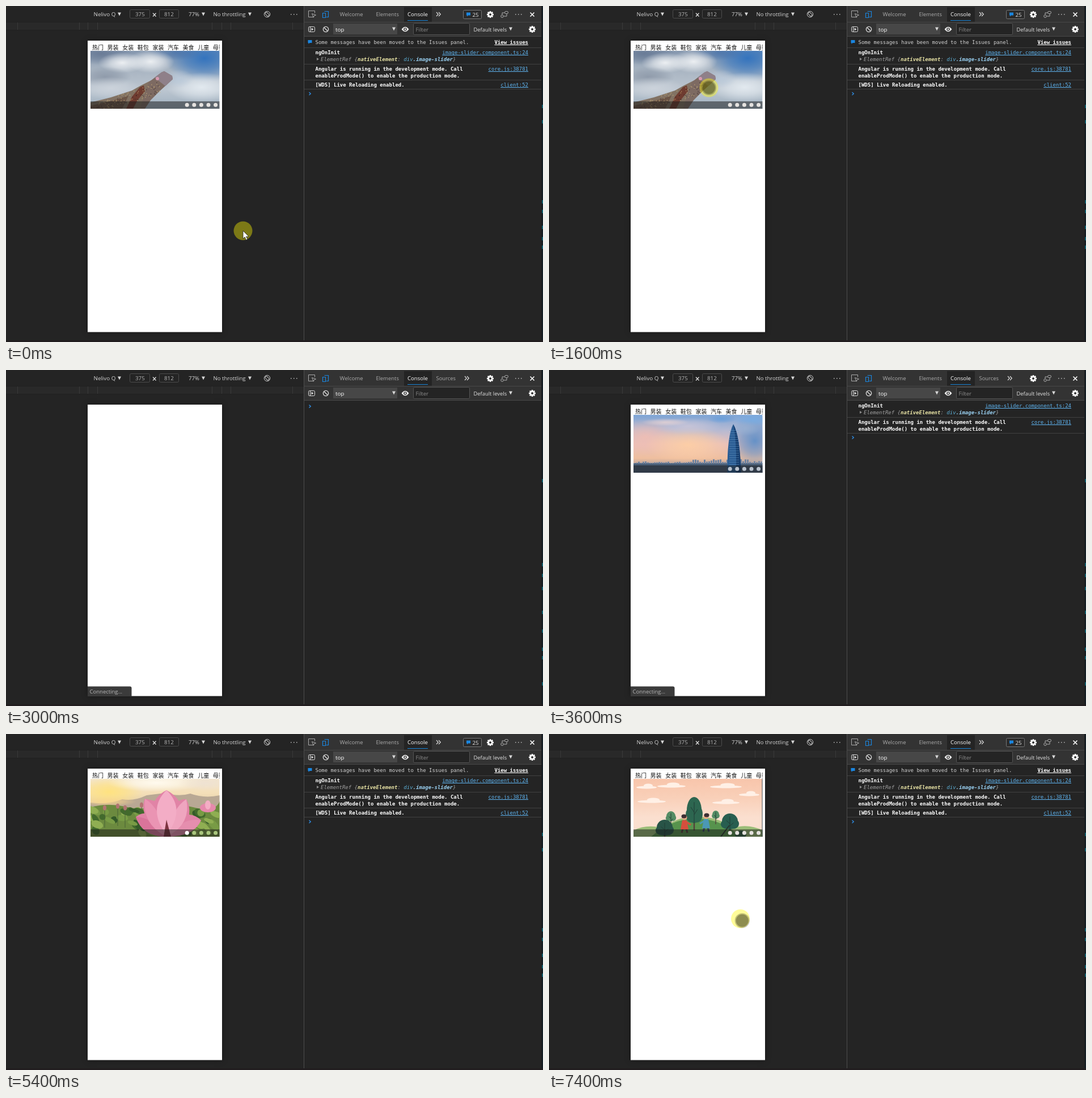
An HTML page with a canvas that plays this animation: 947 px wide and 592 px high, repeating every 8 s.

```html
<!DOCTYPE html>
<html lang="en">
<head>
<meta charset="utf-8">
<title>Slider preview</title>
<style>
  html, body { margin: 0; width: 100%; height: 100%; overflow: hidden; background: #242424; }
  canvas { display: block; }
</style>
</head>
<body>
<canvas id="stage" width="947" height="592"></canvas>
<script>
const ctx = document.getElementById('stage').getContext('2d');
const LOOP = 8000;
const UI = '"Open Sans", "Noto Sans", sans-serif';
const MONO = '"DejaVu Sans Mono", monospace';
const CJK = '"Noto Sans CJK SC", "Noto Sans CJK", "Noto Sans CJK JP", sans-serif';
const PHOTO = { x: 149, y: 79, w: 227.5, h: 102 };

// from, to, x, y, pointer kind, pointer offset from the highlight
const POINTER = [
  [0, 200, 418, 396, 'arrow', 0],
  [200, 400, 368, 233, 'touch', 0],
  [600, 800, 328, 199, 'touch', 0],
  [1600, 1800, 282, 144, 'touch', 0],
  [1800, 2000, 151, 31, 'arrow', 0],
  [2000, 2200, 109, -13, 'arrow', 0],
  [6600, 8000, 337.5, 325.5, 'touch', 3.2]
];

function rect(x, y, w, h, color) {
  ctx.fillStyle = color;
  ctx.fillRect(x, y, w, h);
}
function frame(x, y, w, h, color, fill) {
  ctx.beginPath();
  ctx.roundRect(x + .5, y + .5, w - 1, h - 1, 2);
  if (fill) { ctx.fillStyle = fill; ctx.fill(); }
  ctx.strokeStyle = color;
  ctx.lineWidth = 1;
  ctx.stroke();
}
function poly(points, color) {
  ctx.beginPath();
  for (let i = 0; i < points.length; i += 2) ctx.lineTo(points[i], points[i + 1]);
  ctx.closePath();
  ctx.fillStyle = color;
  ctx.fill();
}
function shape(path, color) {
  ctx.fillStyle = color;
  ctx.fill(new Path2D(path));
}
function line(path, color, width = 1) {
  ctx.strokeStyle = color;
  ctx.lineWidth = width;
  ctx.stroke(new Path2D(path));
}
function oval(x, y, rx, ry, color, angle = 0) {
  ctx.beginPath();
  ctx.ellipse(x, y, rx, ry, angle, 0, Math.PI * 2);
  ctx.fillStyle = color;
  ctx.fill();
}
const dot = (x, y, r, color) => oval(x, y, r, r, color);
function ring(x, y, r, color, width = 1) {
  ctx.beginPath();
  ctx.arc(x, y, r, 0, Math.PI * 2);
  ctx.strokeStyle = color;
  ctx.lineWidth = width;
  ctx.stroke();
}
// soft oval patch; color is "r,g,b"
function glow(x, y, rx, ry, color, alpha = 1) {
  ctx.save();
  ctx.translate(x, y);
  ctx.scale(rx, ry);
  const g = ctx.createRadialGradient(0, 0, 0, 0, 0, 1);
  g.addColorStop(0, `rgba(${color},${alpha})`);
  g.addColorStop(.5, `rgba(${color},${alpha * .6})`);
  g.addColorStop(1, `rgba(${color},0)`);
  ctx.fillStyle = g;
  ctx.fillRect(-1, -1, 2, 2);
  ctx.restore();
}
function backdrop(colors) {
  const g = ctx.createLinearGradient(0, PHOTO.y, 0, PHOTO.y + PHOTO.h);
  colors.forEach((c, i) => g.addColorStop(i / (colors.length - 1), c));
  rect(PHOTO.x, PHOTO.y, PHOTO.w, PHOTO.h, g);
}
function random(seed) {
  return () => (seed = (seed * 16807) % 2147483647) / 2147483647;
}
function text(str, x, y, size, color, family = UI, style = '') {
  ctx.font = `${style} ${size}px ${family}`;
  ctx.fillStyle = color;
  ctx.fillText(str, x, y);
  return x + ctx.measureText(str).width;
}
const mono = (str, x, y, color, style = 'bold') => text(str, x, y, 9, color, MONO, style);
function link(str, y, color = '#5fb4f0', style = '') {
  ctx.font = `${style} 9px ${MONO}`;
  const w = ctx.measureText(str).width;
  mono(str, 921 - w, y, color, style);
  rect(921 - w, y + 1, w, 1, color);
}
const caret = (x, y) => poly([x - 3, y - 3, x + 3, y - 3, x, y + 3], '#d8d8d8');
function ellipsis(x, y) {
  for (let i = -1; i < 2; i++) rect(x + i * 5 - 1, y, 1.5, 1.5, '#bbb');
}
function gear(x, y) {
  for (let i = 0; i < 8; i++) {
    ctx.save();
    ctx.translate(x, y);
    ctx.rotate(i * Math.PI / 4);
    rect(-1.3, -6, 2.6, 3, '#fff');
    ctx.restore();
  }
  ring(x, y, 3.3, '#fff', 2.6);
}

function deviceBar() {
  rect(0, 0, 525, 592, '#242424');
  text('Nelivo Q', 154.5, 18, 9.8, '#d4d4d4');
  caret(200, 14.5);
  frame(218, 6, 36, 16, '#4c4c4c', '#242424');
  text('375', 228, 18, 9.8, '#b5b5b5');
  line('M259 12.5l5.5 6m0-6l-5.5 6', '#ddd', 1.3);
  frame(270, 6, 35, 16, '#4c4c4c', '#242424');
  text('812', 279, 18, 9.8, '#b5b5b5');
  text('77%', 322, 18, 9.6, '#d4d4d4');
  caret(348, 14.5);
  text('No throttling', 365.5, 18, 9.6, '#d4d4d4');
  caret(430, 14.5);
  ctx.save();
  ctx.translate(460.5, 14.5);
  ctx.rotate(-Math.PI / 4);
  frame(-2.5, -4.5, 5, 9, '#d0d0d0');
  ctx.restore();
  ring(460.5, 14.5, 5.2, '#d0d0d0');
  ellipsis(508, 14);
  rect(0, 28, 525, 15, '#292929');
  rect(0, 28, 525, 1, '#202020');
  rect(0, 42, 525, 1, '#1f1f1f');
  for (const x of [20, 129, 144, 161, 363, 380, 396, 505]) rect(x, 29, 1, 13, '#3a3a3a');
}

function tabBar(loading) {
  rect(526, 0, 418, 53, '#333');
  rect(702, 2, 49, 26, '#242424');
  line('M543 19.5h-9.500v-11h11v4M539.500 13.500l7 2.500-3 1.200-1.200 3z', '#aaa');
  line('M561.500 9.500h7v10h-4M558.500 12.500h5v8h-5z', '#1a86e0', 1.2);
  text('Welcome', 588.5, 18, 9.6, '#adadad');
  text('Elements', 652.5, 18, 9.4, '#adadad');
  text('Console', 708, 18, 9.6, '#fff');
  rect(708, 25, 36, 1, '#1a86d9');
  if (loading) text('Sources', 758.5, 18, 9.4, '#adadad');
  const x = loading ? 809 : 759;
  line(`M${x} 11l3.300 3.500-3.300 3.500m4-7l3.300 3.500-3.300 3.500`, '#ddd', 1.2);
  if (!loading) {
    frame(806, 7, 33, 16, '#777', '#2b2b2b');
    shape('M812 11.500h7v5h-4l-2 2v-2h-1z', '#1a86e0');
    text('25', 822.5, 18.5, 9.8, '#e0e0e0');
  }
  gear(854, 15);
  frame(879, 9, 7, 5, '#b0b0b0');
  ring(875, 18, 2.3, '#b0b0b0');
  line('M883 14v4h-5M875 15v-3h4', '#b0b0b0');
  ellipsis(904, 14);
  line('M924.500 11.500l7 7m0-7l-7 7', '#fff', 1.6);

  rect(526, 28, 418, 1, '#484848');
  frame(533, 36, 12, 10, '#ddd');
  rect(536, 36, 1, 10, '#ddd');
  poly([538.5, 38.5, 542.5, 41, 538.5, 43.5], '#ddd');
  ring(564, 41, 4.6, '#ddd', 1.4);
  line('M561 38l6 6', '#ddd', 1.4);
  rect(577, 31, 113, 19, '#474747');
  text('top', 581, 44.5, 9.8, '#fff');
  caret(684, 40.5);
  shape('M697.500 41q6.500-8.500 13 0q-6.500 8.500-13 0z', '#f0f0f0');
  dot(704, 41, 2.8, '#333');
  dot(704, 41, 1.4, '#f0f0f0');
  frame(718, 30, 100, 21, '#555', '#242424');
  text('Filter', 722.5, 44.5, 9.6, '#8d8d8d');
  text('Default levels', 824.5, 44.5, 9.4, '#e2e2e2');
  caret(890, 40.5);
  gear(928, 41);
  rect(526, 53, 418, 1, '#484848');
}

// rows: 0 = cleared, 1 = first messages, 2 = with reload note, 3 = with issue row
function consoleLog(rows) {
  rect(526, 54, 418, 538, '#242424');
  const rule = y => rect(526, y, 418, 1, '#414141');
  let prompt = 64;
  ctx.save();
  if (rows === 3) {
    shape('M532.500 60h7v5h-4l-2 2v-2h-1z', '#1a86e0');
    mono('Some messages have been moved to the Issues panel.', 545.5, 67, '#d2d2d2', '');
    link('View issues', 67, '#fff', 'bold');
    rule(73);
  } else ctx.translate(0, -19);
  if (rows > 0) {
    mono('ngOnInit', 545.5, 85, '#fff');
    link('image-slider.component.ts:24', 85);
    poly([548, 91, 552, 93.500, 548, 96], '#8a8a8a');
    let x = mono('ElementRef {', 555, 97, '#a0a0a0', 'italic');
    x = mono('nativeElement', x, 97, '#e8e3a5', 'italic bold');
    x = mono(': ', x, 97, '#a0a0a0', 'italic');
    x = mono('div', x, 97, '#5db0d7', 'italic');
    x = mono('.image-slider', x, 97, '#9bd3f5', 'italic bold');
    mono('}', x, 97, '#a0a0a0', 'italic');
    rule(102);
    mono('Angular is running in the development mode. Call', 545.5, 114, '#fff');
    mono('enableProdMode() to enable the production mode.', 545.5, 126, '#fff');
    link('core.js:38781', 114);
    rule(130);
    prompt = 138;
  }
  if (rows > 1) {
    mono('[WDS] Live Reloading enabled.', 545.5, 142, '#fff');
    link('client:52', 142);
    rule(146);
    prompt = 154.5;
  }
  if (rows === 0) prompt += 19;
  line(`M534.500 ${prompt - 2.5}l2.800 2.500-2.800 2.500`, '#2f8fe8', 1.3);
  ctx.restore();
}

function edges(late) {
  rect(525, 0, 1, 592, '#4d4d4d');
  rect(944, 0, 1, 592, '#1a1a1a');
  rect(945, 0, 2, 592, '#172126');
  const marks = late ? [195, 343, 362, 385, 427, 460, 492, 507, 553] : [177, 204, 345, 362, 390, 410, 425];
  for (const y of marks) rect(945, y - 3, 2, 6, '#12606f');
  rect(0, 589, 947, 3, '#211d1f');
}

function skyPhoto() {
  backdrop(['#8496ae', '#a9b5c2', '#bcc6d0', '#9fb0bf']);
  glow(350, 92, 70, 42, '52,116,190', 1);
  glow(300, 82, 48, 14, '70,112,168', .7);
  glow(168, 84, 55, 20, '98,116,144', .8);
  glow(205, 100, 42, 18, '236,239,242', 1);
  glow(255, 98, 42, 20, '236,239,242', 1);
  glow(175, 125, 46, 18, '122,134,152', .6);
  glow(345, 143, 62, 26, '226,233,239', 1);
  glow(305, 128, 26, 16, '186,202,219', .8);
  glow(185, 145, 52, 20, '205,212,220', .9);
  poly([149, 181, 149, 170, 185, 161, 222, 149, 238, 140, 256, 131, 264, 146, 248, 168, 240, 181], '#827263');
  poly([149, 181, 149, 176, 190, 166, 216, 158, 205, 181], '#6c5648');
  poly([252, 134, 274, 117, 279, 115, 293, 123, 294, 129, 272, 149, 255, 166, 245, 181, 236, 181], '#7d6a62');
  poly([262, 126, 274, 117, 279, 115, 293, 123, 294, 129, 281, 141], '#8f8089');
  poly([222, 160, 236, 143, 243, 140, 245, 150, 232, 166, 224, 181, 212, 181], '#6f3c30');
  const rnd = random(41);
  for (let i = 0; i < 110; i++) {
    const x = 160 + rnd() * 112, y = 170 - (x - 160) * .34 + rnd() * 20;
    rect(x, y, 1.4, 1.6, i % 3 ? 'rgba(216,188,126,.6)' : 'rgba(50,36,38,.6)');
  }
  dot(267, 128, 3, '#d79ab0');
}

function towerPhoto() {
  backdrop(['#7da4d5', '#b3b9d3', '#e7c0bb', '#efbf9f', '#7d8395']);
  glow(170, 118, 60, 32, '242,190,178', .85);
  glow(245, 132, 75, 32, '253,206,165', .95);
  glow(245, 99, 60, 15, '205,199,216', .8);
  glow(205, 92, 42, 7, '239,214,211', .75);
  glow(363, 125, 45, 45, '95,143,199', .95);
  glow(360, 87, 38, 12, '120,172,226', .9);
  glow(346, 103, 28, 13, '153,176,209', .8);
  glow(305, 86, 26, 8, '100,157,219', .8);
  rect(149, 164, 228, 17, '#4a5f78');
  const rnd = random(9);
  for (let x = 149; x < 376; x += 4) {
    const h = 1 + rnd() * (x > 250 ? 7 : 3);
    rect(x, 165 - h, 3, h, '#6f83a0');
  }
  shape('M314.500 181Q314 116 325 95.500Q337 116 338.500 181z', '#2b5d94');
  shape('M325 95.500Q337 116 338.500 181H330Q331 125 325 95.500z', '#173f70');
  for (let y = 106; y < 178; y += 4) rect(318, y, 17, 1, 'rgba(112,163,206,.4)');
}

function lotusPhoto() {
  backdrop(['#f4e6cc', '#f4dfb8', '#d9c5a2', '#76904c', '#3f6129']);
  glow(182, 102, 60, 26, '255,226,128', 1);
  glow(265, 86, 85, 16, '255,250,238', 1);
  glow(352, 87, 48, 13, '238,226,212', .9);
  shape('M149 121Q180 125 205 115Q225 119 248 108L280 104Q305 111 325 105Q350 114 377 108V140H149z', '#b9a894');
  glow(180, 119, 50, 9, '250,215,140', .8);
  shape('M149 129Q180 121 210 128T265 127T330 129T377 118V181H149z', '#6c8a3f');
  const rnd = random(23);
  for (let i = 0; i < 60; i++) {
    const x = 149 + rnd() * 228, y = 133 + rnd() * 42;
    oval(x, y, 5 + rnd() * 8, 3 + rnd() * 4, ['#426a2c', '#789b45', '#8fae52', '#345a28'][i % 4], rnd());
  }
  for (const [x, y] of [[174, 130], [197, 127], [210, 130], [239, 125]]) {
    line(`M${x} ${y}v35`, '#496336');
    oval(x, y, 3, 4.500, '#b27473');
  }
  oval(356, 130, 14, 8, '#e68aac');
  oval(356, 125, 5, 8, '#f4adc4');
  // full silhouette first, then the overlapping petals
  shape('M283 181Q240 181 229 146Q238 139 244 140Q240 125 245 114Q254 116 262 118Q270 105 283 99Q297 106 305 118Q312 114 318 115Q325 128 323 142Q335 143 344 152Q332 181 283 181z', '#e183a6');
  shape('M280 181Q240 179 229 146Q258 146 280 181z', '#d9749a');
  shape('M286 181Q330 179 344 152Q312 146 286 181z', '#e58eae');
  shape('M281 180Q240 158 245 114Q272 130 281 180z', '#ea94b3');
  shape('M285 180Q327 158 318 115Q293 130 285 180z', '#efa5bf');
  shape('M283 178Q249 132 283 99Q318 132 283 178z', '#f3adc6');
  shape('M278 181L283 151L291 181z', '#7d3441');
}

function tree(x, y, rx, ry, color, trunk) {
  line(`M${x} ${y - ry * .4}V${y + trunk}`, '#55413a', rx > 10 ? 2.4 : 1.3);
  oval(x, y, rx, ry, color);
  oval(x - rx * .4, y + ry * .35, rx * .75, ry * .6, color);
  oval(x + rx * .4, y + ry * .3, rx * .75, ry * .65, color);
  line(`M${x} ${y + ry}V${y - ry * .6}M${x} ${y + 4}l${-rx * .45} ${-ry * .4}M${x} ${y + 8}l${rx * .45} ${-ry * .4}`, '#213c35');
}
function child(x, y, shirt, legs, side) {
  line(`M${x - 3} ${y + 20}l-2 7M${x + 3} ${y + 20}l2 7`, legs, 3);
  poly([x - 4, y + 5, x + 4, y + 5, x + 7, y + 21, x - 7, y + 21], shirt);
  line(`M${x + side * 3} ${y + 8}l${side * 8} 5`, shirt, 3);
  dot(x, y, 4.5, '#e9a987');
  oval(x - side, y - 2, 4.500, 3.500, '#3e3034');
}
function drawnScene() {
  backdrop(['#f8c5ab', '#f9d0b9', '#fbdfcf', '#f8dfcf']);
  for (const [x, y, w] of [[172, 94, 18], [216, 92, 25], [312, 93, 28], [353, 107, 18], [181, 119, 25], [312, 121, 24]]) {
    oval(x, y, w, 2.500, '#fff0e6');
    oval(x + 3, y - 3, w * .45, 3.500, '#fff0e6');
  }
  shape('M149 181V170Q172 158 202 166Q225 145 258 146Q301 145 323 166Q351 157 377 170V181z', '#9bbd78');
  shape('M180 181Q218 149 258 149Q305 149 337 181z', '#57934d');
  tree(215, 145, 8, 9, '#548c65', 23);
  tree(294, 142, 6, 7, '#548c65', 17);
  tree(256, 134, 13, 23, '#2d6650', 36);
  tree(204, 165, 14, 14, '#285447', 16);
  tree(319, 154, 14, 14, '#285e50', 23);
  line('M303 181l15-20', '#29352f', 2);
  child(239, 147, '#d64e3d', '#563d3d', 1);
  child(277, 145, '#4b98b5', '#354461', -1);
  oval(338, 177, 10, 7, '#315f43');
  rect(375.5, 79, 1.5, 102, '#40515a');
}

function phone(t) {
  ctx.save();
  ctx.shadowColor = 'rgba(0,0,0,.35)';
  ctx.shadowBlur = 10;
  rect(144, 61, 237, 513.5, '#fff');
  ctx.restore();
  if (t >= 3000 && t < 3600) return;
  ctx.save();
  ctx.beginPath();
  ctx.rect(149, 61, 228, 120);
  ctx.clip();
  ['热门', '男装', '女装', '鞋包', '家装', '汽车', '美食', '儿童', '母婴']
    .forEach((name, i) => text(name, 152 + i * 26.6, 76.5, 10, '#111', CJK));
  ctx.beginPath();
  ctx.rect(PHOTO.x, PHOTO.y, PHOTO.w, PHOTO.h);
  ctx.clip();
  const lotus = t >= 5400 && t < 7400;
  if (t < 3000) skyPhoto();
  else if (t < 5400) towerPhoto();
  else if (lotus) lotusPhoto();
  else drawnScene();
  rect(149, 168, 228, 13, 'rgba(25,25,25,.5)');
  const tone = t < 3000 || t >= 7400 ? '#e5e2df' : lotus ? '#a9c67d' : '#b9c2ce';
  for (let i = 0; i < 5; i++) dot(319.2 + i * 12.6, 174.2, 3.5, lotus && !i ? '#fff' : tone);
  ctx.restore();
}

function status(t) {
  if (t < 3000 || t >= 4000) return;
  ctx.save();
  ctx.globalAlpha = t < 3800 ? 1 : .5;
  ctx.beginPath();
  ctx.roundRect(144, 557.5, 77.5, 17.5, [0, 3, 0, 0]);
  ctx.fillStyle = '#3b3b3b';
  ctx.fill();
  text('Connecting...', 147.5, 570, 9.5, '#b8b8b8');
  ctx.restore();
}

function pointer(t) {
  const p = POINTER.find(([from, to]) => t >= from && t < to);
  if (!p) return;
  const [, , x, y, kind, off] = p;
  dot(x, y, 16.5, 'rgba(255,248,0,.4)');
  if (kind === 'touch') {
    dot(x + off, y + off, 13, 'rgba(40,40,25,.28)');
    dot(x + off, y + off, 11, 'rgba(40,40,10,.34)');
    return;
  }
  const arrow = `M${x} ${y}v14l3.200-3 2.300 5.200 2.400-1-2.300-5h4.600z`;
  shape(arrow, '#fff');
  line(arrow, '#222', .8);
}

function draw() {
  const t = performance.now() % LOOP;
  const loading = t >= 3000 && t < 5400;
  deviceBar();
  tabBar(loading);
  consoleLog(!loading ? 3 : t < 3600 ? 0 : t < 3800 ? 1 : 2);
  edges(t >= 2600 && t < 5400);
  phone(t);
  status(t);
  pointer(t);
  requestAnimationFrame(draw);
}
requestAnimationFrame(draw);
</script>
</body>
</html>
```
